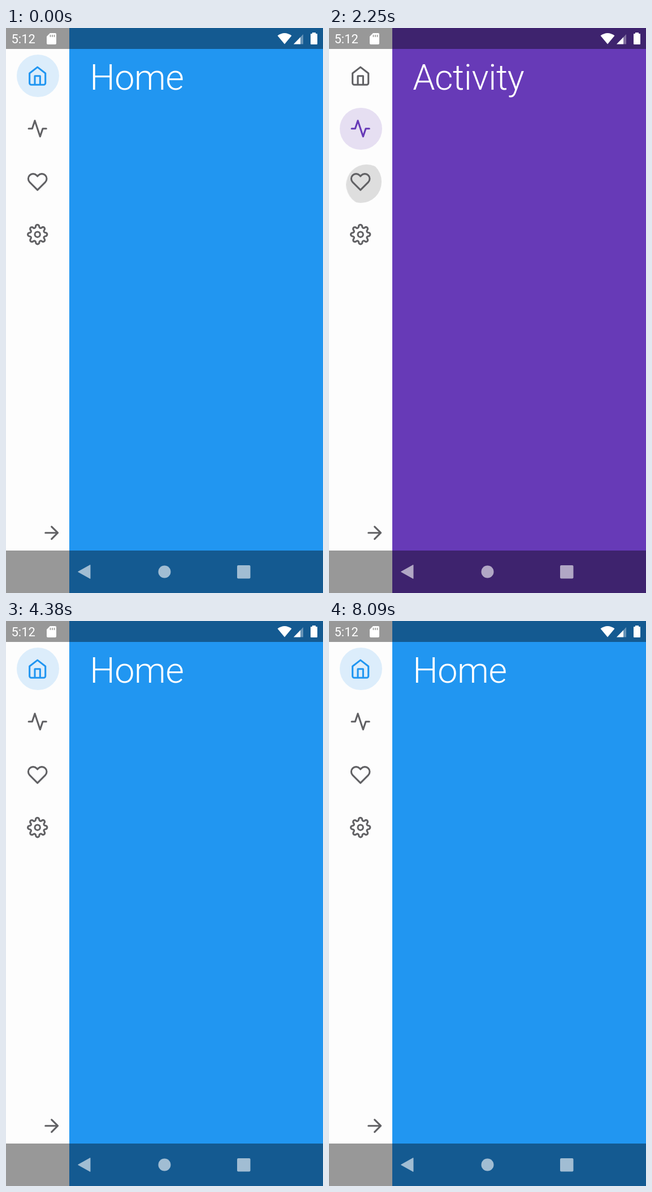
These frames come from a looping animation (561x998 px, 8.17 s). An HTML page:

```html
<!DOCTYPE html>
<html lang="en">
<head>
<meta charset="utf-8">
<title>Collapsible sidebar</title>
<style>
@property --on { syntax: "<number>"; inherits: true; initial-value: 0; }
@property --p { syntax: "<number>"; inherits: true; initial-value: 0; }
@property --open { syntax: "<number>"; inherits: true; initial-value: 0; }

html, body { margin: 0; width: 100%; height: 100%; overflow: hidden; background: #fdfdfd; }
* { box-sizing: border-box; }

#stage {
  --loop: 8170ms;
  --side: calc(112.2px + 199.4px * var(--p));
  position: relative; width: 561px; height: 998px; overflow: hidden;
  font-family: Roboto, "Open Sans", sans-serif;
  animation: expand var(--loop) linear infinite, toggle var(--loop) step-end infinite;
}
#stage > *, .item > * { position: absolute; }

/* --k: theme colour, --s: time the tab becomes active */
.home { --k: #2196f1; --s: 4180ms; --tab: long; }
.activity { --k: #673ab7; --s: 1510ms; }
.favorites { --k: #e91e63; --s: 2400ms; }
.settings { --k: #4caf50; --s: 3290ms; }
.home, .activity, .favorites, .settings {
  animation: active var(--loop) step-end calc(var(--s) - var(--loop)) infinite;
}
.home { animation-name: active-long; }

.page { inset: 0; background: var(--k); opacity: var(--on); }
.page h1 {
  position: absolute; left: calc(var(--side) + 36px); top: 56px; margin: 0;
  font-size: 63px; line-height: 63px; font-weight: 350; letter-spacing: -.5px;
  color: #fff; white-space: nowrap;
}

.side { left: 0; top: 0; width: var(--side); height: 998px; padding-top: 37.75px; overflow: hidden; background: #fdfdfd; }
.item { position: relative; height: 93.5px; --ink: color-mix(in srgb, var(--k) calc(var(--on) * 100%), #616164); }
.pill {
  left: calc(18.7px * (1 - var(--p))); right: 18.7px; top: 9.35px; height: 74.8px;
  --r: calc(37.4px * (1 - var(--p)) * (1 - var(--p)));
  border-radius: var(--r) 37.4px 37.4px var(--r);
  background: var(--k); opacity: calc(var(--on) * .15);
}
.touch { left: 18.7px; top: 9.35px; width: 74.8px; height: 74.8px; border-radius: 50%; overflow: hidden; }
.touch::before {
  content: ""; position: absolute; inset: 0; border-radius: 50%; background: rgba(0, 0, 0, .12);
  animation: ripple var(--loop) linear calc(var(--s) - 230ms - var(--loop)) infinite;
}
.icon { width: 37.4px; height: 37.4px; fill: none; stroke: #616164; stroke-width: 2; stroke-linecap: round; stroke-linejoin: round; overflow: visible; }
.item .icon { left: 37.4px; top: 28px; stroke: var(--ink); }
.item span {
  left: 117px; top: 1.6px; font-size: 21px; line-height: 93.5px; letter-spacing: -.2px;
  color: var(--ink); white-space: nowrap;
}
.arrow { position: absolute; right: 12.5px; top: 873.3px; transform: scaleX(calc(1 - 2 * var(--open))); }

.bar { left: 0; width: 561px; background: rgba(0, 0, 0, .4); }
.bars { left: 0; top: 0; }

@keyframes active { 0% { --on: 1; } 10.894%, 100% { --on: 0; } }
@keyframes active-long { 0% { --on: 1; } 67.319%, 100% { --on: 0; } }
@keyframes expand {
  0% { --p: 0; }
  68.115% { --p: 0; animation-timing-function: cubic-bezier(.455, .03, .515, .955); }
  71.787% { --p: 1; }
  78.825% { --p: 1; animation-timing-function: cubic-bezier(.455, .03, .515, .955); }
  82.497%, 100% { --p: 0; }
}
@keyframes toggle { 0% { --open: 0; } 68.115% { --open: 1; } 78.825%, 100% { --open: 0; } }
@keyframes ripple {
  0% { transform: translate(15px, 8px) scale(.55); opacity: 0; }
  .979% { transform: translate(10px, 5.5px) scale(.96); opacity: 1; }
  2.815% { transform: none; opacity: 1; }
  5.263%, 100% { transform: none; opacity: 0; }
}
</style>
</head>
<body>
<div id="stage">
  <div class="page home"><h1>Home</h1></div>
  <div class="page activity"><h1>Activity</h1></div>
  <div class="page favorites"><h1>Favorites</h1></div>
  <div class="page settings"><h1>Settings</h1></div>

  <div class="side">
    <div class="item home">
      <div class="pill"></div><div class="touch"></div>
      <svg class="icon" viewBox="0 0 24 24"><path d="M3 9l9-7 9 7v11a2 2 0 0 1-2 2H5a2 2 0 0 1-2-2zM9 22V12h6v10"/></svg>
      <span>Home</span>
    </div>
    <div class="item activity">
      <div class="pill"></div><div class="touch"></div>
      <svg class="icon" viewBox="0 0 24 24"><path d="M22 12h-4l-3 9L9 3l-3 9H2"/></svg>
      <span>Activity</span>
    </div>
    <div class="item favorites">
      <div class="pill"></div><div class="touch"></div>
      <svg class="icon" viewBox="0 0 24 24"><path d="M20.84 4.61a5.5 5.5 0 0 0-7.78 0L12 5.67l-1.06-1.06a5.5 5.5 0 0 0-7.78 7.78L12 21.23l8.84-8.84a5.5 5.5 0 0 0 0-7.78z"/></svg>
      <span>Favorites</span>
    </div>
    <div class="item settings">
      <div class="pill"></div><div class="touch"></div>
      <svg class="icon" viewBox="0 0 24 24">
        <circle cx="12" cy="12" r="3"/>
        <path id="cog" d="M19.4 15a1.65 1.65 0 0 0 .33 1.82l.06.06a2 2 0 1 1-2.83 2.83l-.06-.06a1.65 1.65 0 0 0-1.82-.33 1.65 1.65 0 0 0-1 1.51V21a2 2 0 1 1-4 0v-.09A1.65 1.65 0 0 0 9 19.4"/>
        <use href="#cog" transform="rotate(90 12 12)"/>
        <use href="#cog" transform="rotate(180 12 12)"/>
        <use href="#cog" transform="rotate(270 12 12)"/>
      </svg>
      <span>Settings</span>
    </div>
    <svg class="icon arrow" viewBox="0 0 24 24"><path d="M5 12h14M12 5l7 7-7 7"/></svg>
  </div>

  <div class="bar" style="top:0;height:37.4px"></div>
  <div class="bar" style="top:923.2px;height:74.8px"></div>
  <svg class="bars" width="561" height="998" fill="#fff">
    <text x="9.5" y="27" font-size="22">5:12</text>
    <path d="M78 9h9a2 2 0 0 1 2 2v16a2 2 0 0 1-2 2H74a2 2 0 0 1-2-2V15z"/>
    <path d="M78.5 12v4M82 12v4M85.500 12v4" stroke="#989896" stroke-width="1.600"/>
    <path d="M480.500 13.500Q493 4.500 505.500 13.500L493 28.500z"/>
    <path d="M509 28.500L526 11V28.500z" opacity=".35"/>
    <path d="M509 28.500L521 16.200V28.500z"/>
    <path d="M542 10V8h6v2h2a1 1 0 0 1 1 1v17a1 1 0 0 1-1 1h-10a1 1 0 0 1-1-1V11a1 1 0 0 1 1-1z"/>
    <g opacity=".6">
      <path d="M127.500 960.500L149 948.500V972.500z" stroke="#fff" stroke-linejoin="round"/>
      <circle cx="280.500" cy="960.500" r="11"/>
      <rect x="409" y="949" width="23.500" height="23.500" rx="2"/>
    </g>
  </svg>
</div>
</body>
</html>
```
